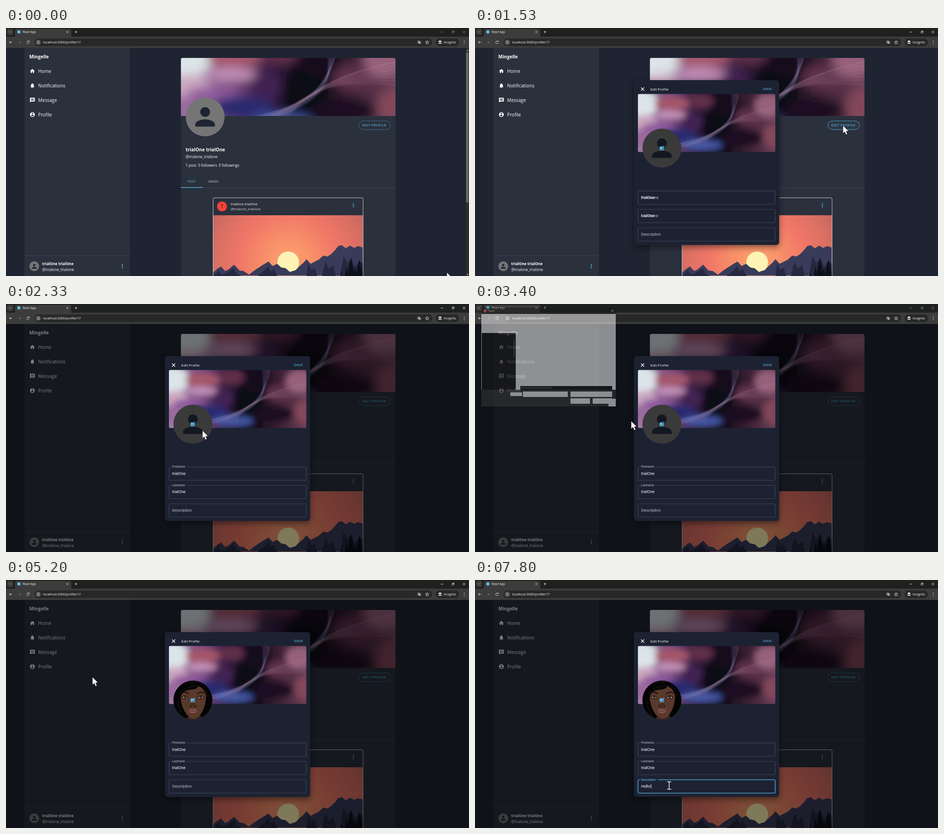
Write an HTML page that moves like this. It is 1023x547 px and loops after 8000 ms.

```html
<!DOCTYPE html>
<html lang="en">
<head>
<meta charset="utf-8">
<title>Edit profile</title>
<style>
html, body { margin: 0; width: 100%; height: 100%; overflow: hidden; background: #1e2431; }
svg.stage { display: block; width: 100vw; height: 100vh; }
text { font-family: 'Open Sans', 'Noto Sans', sans-serif; fill: #fff; white-space: pre; }
.a { font-family: 'Liberation Sans', Arial, sans-serif; }
.b { font-weight: 700; }
.m { font-weight: 500; }
.cyan { fill: #5bbdec; }
.ln { fill: none; stroke: #e6e6e6; stroke-width: .9; }
.c { text-anchor: middle; }
.btn { font-size: 7.47px; letter-spacing: .21px; }
.dlg text { font-size: 5.95px; }
</style>
</head>
<body>
<svg class="stage" viewBox="0 0 1023 547" preserveAspectRatio="none">
<defs>
  <filter id="soft" filterUnits="userSpaceOnUse" x="-320" y="-170" width="640" height="340"><feGaussianBlur stdDeviation="11"/></filter>
  <filter id="haze" filterUnits="userSpaceOnUse" x="-320" y="-170" width="640" height="340"><feGaussianBlur stdDeviation="1.3"/></filter>
  <filter id="shade" x="-15%" y="-15%" width="130%" height="130%"><feDropShadow dx="0" dy="5" stdDeviation="7" flood-opacity=".45"/></filter>
  <linearGradient id="base">
    <stop offset="0" stop-color="#b79ab4"/><stop offset=".3" stop-color="#74457a"/>
    <stop offset=".45" stop-color="#2c1738"/><stop offset=".6" stop-color="#100a18"/>
    <stop offset=".75" stop-color="#3c2034"/><stop offset="1" stop-color="#84506a"/>
  </linearGradient>
  <radialGradient id="sky" gradientUnits="userSpaceOnUse" cx="624" cy="517" r="215">
    <stop offset="0" stop-color="#fca670"/><stop offset=".25" stop-color="#f88f69"/>
    <stop offset=".5" stop-color="#f07767"/><stop offset=".75" stop-color="#d96f63"/><stop offset="1" stop-color="#b8625b"/>
  </radialGradient>
  <clipPath id="coverBox"><path d="M386.500 194V70q0-4 4-4H856.500q4 0 4 4V194z"/></clipPath>
  <clipPath id="modalCover"><rect x="360" y="145.500" width="303.500" height="128" rx="3"/></clipPath>
  <clipPath id="photoBox"><rect x="458" y="413" width="331" height="134"/></clipPath>
  <clipPath id="face"><circle cx="413" cy="265" r="43"/></clipPath>
  <g id="art">
    <g id="blobs" filter="url(#soft)"></g>
    <g id="rays" filter="url(#haze)" fill="none"></g>
  </g>
  <path id="person" d="M0 0c2.210 0 4-1.790 4-4s-1.790-4-4-4-4 1.790-4 4 1.790 4 4 4zm0 2c-2.670 0-8 1.340-8 4v2h16v-2c0-2.660-5.330-4-8-4z"/>
  <g id="more"><circle cy="-3.500" r="1.150"/><circle r="1.150"/><circle cy="3.500" r="1.150"/></g>
  <path id="down" d="M-2.200-1.100 0 1.100 2.200-1.100" fill="none" stroke="#ddd" stroke-width=".8"/>
  <path id="cross" d="M-2.800-2.800 2.800 2.800M2.800-2.800-2.800 2.800" fill="none"/>
</defs>

<!-- page -->
<rect width="1023" height="547" fill="#1e2431"/>
<rect x="41" y="44" width="233" height="503" fill="#2b303d"/>
<text class="b" x="51.500" y="66.500" font-size="10.100">Mingelle</text>
<g id="nav"></g>
<path d="M41 502H274" stroke="#454b59" stroke-width=".8"/>
<circle cx="62.500" cy="525.500" r="10.700" fill="#757575"/>
<use href="#person" transform="translate(62.500 525.500)scale(.67)" fill="#1e2431"/>
<text class="b" x="80" y="522.500" font-size="8.100">trialOne trialOne</text>
<text x="80" y="535.500" font-size="8.200">@trialone_trialone</text>
<use href="#more" x="257" y="525.500" class="cyan"/>

<rect x="386.500" y="66" width="474" height="481" rx="4" fill="#2b303d"/>
<g clip-path="url(#coverBox)"><use href="#art" transform="translate(623.500 130)"/></g>
<circle cx="440" cy="196" r="43" fill="#757575"/>
<use href="#person" transform="translate(440 196)scale(2.700)" fill="#1e2431"/>
<rect x="779.500" y="205" width="70" height="19" rx="9.500" fill="none" stroke="#5bbdec" stroke-opacity=".55" stroke-width=".8"/>
<rect id="hover" x="779.500" y="205" width="70" height="19" rx="9.500" fill="#5bbdec" fill-opacity=".04" stroke="#5bbdec" stroke-opacity=".6" stroke-width=".8"/>
<text class="a cyan btn" x="787.300" y="217">EDIT PROFILE</text>
<text class="b" x="397" y="272" font-size="10.200">trialOne trialOne</text>
<g font-size="8.200">
  <text x="397" y="287">@trialone_trialone</text>
  <text x="397" y="306">1 post</text><text x="424.500" y="306">0 followers</text><text x="470" y="306">0 followings</text>
</g>
<g font-size="6.500" letter-spacing=".2">
  <text class="a cyan" x="401" y="341.300">POST</text><text class="a" x="447" y="341.300" style="fill:#c3c6cb">SAVED</text>
</g>
<path d="M386.500 352.300H860.500" stroke="#4a505d" stroke-width=".8"/>
<path d="M386.500 351.600H434.500" stroke="#5bbdec" stroke-width="1.200"/>
<g id="photo" clip-path="url(#photoBox)"></g>
<path d="M457.500 548V377.500q0-3 3-3H786q3 0 3 3V548" fill="none" stroke="#dcdee2" stroke-width=".9"/>
<circle cx="477.300" cy="393.500" r="10.800" fill="#f44336"/>
<text class="a c" x="477.300" y="397.300" font-size="10.600" style="fill:#1e2431">T</text>
<text class="m" x="496.500" y="391" font-size="7.600">trialOne trialOne</text>
<text x="496.500" y="401.800" font-size="7.700" style="fill:#d5d7db">@trialone_trialone</text>
<use href="#more" x="767.500" y="391" class="cyan"/>
<g id="scroll">
  <rect x="1015.500" y="44" width="7.500" height="503" fill="#2c2c2c"/>
  <rect x="1016.700" y="53" width="5.200" height="332" rx="2.600" fill="#686868"/>
  <path d="M1017.200 50.500l2.300-3 2.300 3zM1017.200 542.500l2.300 3 2.300-3z" fill="#aaa"/>
</g>

<rect id="backdrop" y="44" width="1023" height="503" fill="#000" fill-opacity=".5"/>

<!-- modal -->
<g id="modal">
  <rect x="351" y="115" width="321" height="363.500" rx="6" fill="#1e2431" filter="url(#shade)"/>
  <use href="#cross" transform="translate(370.300 134.700)scale(1.250)" stroke="#fff" stroke-width="1.050"/>
  <text class="m" x="387.500" y="137.600" font-size="8">Edit Profile</text>
  <text class="a cyan btn" x="636" y="136.700">SAVE</text>
  <g clip-path="url(#modalCover)"><use href="#art" transform="translate(511.500 209.500)scale(.64)"/></g>
  <circle cx="413" cy="265" r="43" fill="#3a3a3a"/>
  <use href="#person" transform="translate(413 265)scale(2.700)" fill="#131722"/>
  <g id="portrait" clip-path="url(#face)">
    <rect x="370" y="222" width="86" height="86" fill="#040404"/>
    <path d="M400 290h29l6 22h-40z" fill="#38241b"/>
    <path d="M385 247C384 226 441 224 442 248C444 268 438 288 426 301Q414 311 403 301C391 289 385 269 385 247Z" fill="#59392b"/>
    <path d="M385 247C384 270 391 289 403 301L396 308H380V240Z" fill="#040404"/>
    <path d="M442 250C443 270 437 288 428 300L440 304L456 262Z" fill="#040404"/>
    <path d="M380 262C378 228 410 218 428 226C446 232 448 246 444 262C440 246 436 237 424 234C424 246 397 237 390 250Q384 257 386 268Z" fill="#040404"/>
    <path d="M385 252C391 234 410 238 424 231M394 230Q408 223 422 226M433 232Q445 242 446 258M380 266q1 20 11 34" fill="none" stroke="#2a2a2a" stroke-width=".8"/>
    <path d="M387 250q8-6 17 1M422 251q9-6 16-2" fill="none" stroke="#100b09" stroke-width="2"/>
    <path d="M388 259q7-7 15 1q-8 5-15-1zM422 260q8-8 16-1q-7 6-16 1z" fill="#978a83" stroke="#0b0706" stroke-width="1.200"/>
    <circle cx="396" cy="258.500" r="2.700" fill="#40251a"/><circle cx="430" cy="258.500" r="2.700" fill="#40251a"/>
    <path d="M411 264q-2 9-6 13q2 5 8 4q7 1 8-4q-4-4-5-10" fill="#4b2e22"/>
    <path d="M405 279q3-2 5 1M416 280q3-3 5-1" fill="none" stroke="#180e0a" stroke-width="1.200"/>
    <path d="M401 288q8-5 12-2q4-3 12 2q-12 11-24 0z" fill="#8a5758"/>
    <path d="M401 288q12 3 24 0" fill="none" stroke="#24100f" stroke-width=".9"/>
  </g>
  <path class="cyan" transform="translate(406.600 258.600)scale(.533)" d="M19 7v2.990s-1.990.010-2 0V7h-3s.010-1.990 0-2h3V2h2v3h3v2h-3zm-3 4V8h-3V5H5c-1.100 0-2 .900-2 2v12c0 1.100.900 2 2 2h12c1.100 0 2-.900 2-2v-8h-3zM5 19l3-4 2 3 3-4 4 5H5z"/>
  <g id="fields"></g>
  <text class="a" id="typed" x="367" y="457.700" font-size="8.530"></text>
  <path id="caret" d="M367.400 450V460" stroke="#fff" stroke-width=".8"/>
</g>

<!-- browser -->
<rect width="1023" height="20" fill="#1f2020"/>
<rect y="19" width="1023" height="25" fill="#3c3c3c"/>
<path d="M16 19.500q4 0 4-4V6q0-4 4-4H140q4 0 4 4v9.500q0 4 4 4z" fill="#3c3c3c"/>
<rect x="2" y="2" width="14" height="13.500" rx="4" fill="#3c3c3c"/>
<use href="#down" x="9" y="8.700"/>
<circle cx="28.500" cy="8.600" r="3.600" fill="#58c4dc"/>
<text x="37" y="11" font-size="6.200">React App</text>
<use href="#cross" transform="translate(135.500 8.700)scale(.75)" stroke="#e6e6e6" stroke-width="1.200"/>
<path class="ln" d="M151.500 8.700h6M154.500 5.700v6"/>
<path class="ln" d="M13.500 31.500h-6m2.800-2.800-2.800 2.800 2.800 2.800"/>
<path class="ln" style="stroke:#777" d="M26.500 31.500h6m-2.800-2.800 2.800 2.800-2.800 2.800"/>
<path class="ln" d="M51.300 30a3 3 0 1 0 .200 2.600M51.700 28v2.400h-2.400"/>
<rect x="63" y="23" width="879" height="17" rx="8.500" fill="#282828"/>
<circle cx="71.500" cy="31.500" r="6.500" fill="#3c3c3c"/>
<circle class="ln" cx="71.500" cy="31.500" r="3.300"/><path class="ln" d="M71.500 31v2.300M71.500 29.300v.900"/>
<text x="82" y="34" font-size="7.150">localhost:3000/profile/17</text>
<path class="ln" d="M908.800 31.500q4.200-5.600 8.400 0q-4.200 5.600-8.400 0zM909.800 27.800l7 7.400"/><circle cx="913" cy="31.500" r="1.500" fill="#e6e6e6"/>
<path class="ln" d="M930.500 27.600l1.100 2.700 2.900.200-2.200 1.900.700 2.900-2.500-1.600-2.500 1.600.700-2.900-2.200-1.900 2.900-.200z"/>
<rect x="949" y="23" width="52" height="17" rx="8.500" fill="#282828"/>
<path d="M955 31h8v-.900h-1.400l-.700-2.600h-3.800l-.700 2.600H955z" fill="#e6e6e6"/><path class="ln" d="M958.500 33.300h1"/><circle cx="957.200" cy="33.400" r="1.500" fill="#e6e6e6"/><circle cx="960.800" cy="33.400" r="1.500" fill="#e6e6e6"/>
<text x="967" y="33.700" font-size="6.250">Incognito</text>
<g fill="#e6e6e6"><circle cx="1012.500" cy="28.500" r=".8"/><circle cx="1012.500" cy="31.500" r=".8"/><circle cx="1012.500" cy="34.500" r=".8"/></g>
<g id="controls" fill="none" stroke-width=".9">
  <path d="M960.500 9h5.500"/><rect x="985.500" y="7.500" width="3.600" height="3.600" rx=".8"/><path d="M986.700 6.500h2.500q1 0 1 1v2.400"/>
  <use href="#cross" x="1012" y="8.800"/>
</g>

<!-- half-painted file dialog -->
<g id="ghost">
  <rect x="14" y="8" width="297" height="218" rx="4" fill="#191919"/>
  <rect x="14" y="189" width="297" height="37" fill="#383838"/>
  <g id="blanks" fill="#fff"></g>
  <path d="M86.500 78V118M100 185H169" stroke="#999"/>
  <circle cx="22" cy="15" r="3.600" fill="#e2503f"/><text x="29" y="17" font-size="5.600">Open</text>
  <use href="#cross" x="303.500" y="15" stroke="#fff" stroke-width=".9"/>
</g>

<!-- file dialog -->
<g id="dialog" class="dlg">
  <rect x="2" y="-5" width="327" height="244" rx="4" fill="#1c1c1c" stroke="#3d3d3d" stroke-width=".6"/>
  <rect x="2.500" y="60" width="326" height="138" fill="#191919"/>
  <path d="M2.300 197.500H328.700V235q0 4-4 4H6.300q-4 0-4-4z" fill="#333"/>
  <circle cx="11.300" cy="6" r="4.300" fill="#e2503f"/>
  <text x="18.500" y="8.300">Open</text>
  <use href="#cross" x="320.500" y="6" stroke="#fff" stroke-width=".9"/>
  <path class="ln" d="M17 29h-6m2.500-2.500L11 29l2.500 2.500M29.500 29h6M33 26.500l2.500 2.500-2.500 2.500M64.500 32v-6M62 28.500l2.500-2.500 2.500 2.500"/>
  <use href="#down" x="48.500" y="29"/>
  <g fill="none" stroke="#505050" stroke-width=".8"><rect x="76" y="20" width="132" height="18"/><rect x="214.500" y="20" width="107.500" height="18"/></g>
  <path class="ln" d="M85 25.500v5M83 28.700l2 2 2-2M82 32.500h6M93.500 27l2 2-2 2M199.500 27.500a2.700 2.700 0 1 0 .300 2.300M200 25.800v2h-2"/>
  <text x="100.500" y="31">Downloads</text><use href="#down" x="178" y="29.300"/>
  <text x="219" y="31" style="fill:#999">Search Downloads</text>
  <circle class="ln" cx="312" cy="28.300" r="1.800"/><path class="ln" d="M310.700 29.700l-2.200 2.300"/>
  <text x="12.500" y="53.700">Organize</text><path d="M40.500 51h4l-2 2.200zM277.300 51h4l-2 2.200z" fill="#ddd"/>
  <text x="61" y="53.700">New folder</text>
  <rect x="264" y="48" width="7.500" height="7.500" fill="#555" stroke="#ddd" stroke-width=".8"/><path class="ln" d="M264 50.500h7.500M264 53h7.500"/>
  <rect class="ln" x="293" y="48" width="8" height="7.500"/><rect x="297" y="48.500" width="3.700" height="6.500" fill="#4aa8e8"/>
  <circle cx="316.500" cy="51.700" r="4.500" fill="#1687d9"/><text class="c" x="316.500" y="53.900">?</text>
  <rect x="4" y="60.500" width="73" height="16.500" rx="1.500" fill="#373737"/>
  <g id="places"></g>
  <path d="M8 86.500H72M88 60V197" stroke="#3a3a3a" stroke-width=".7"/>
  <path d="M82 76V120" stroke="#999" stroke-width="1"/>
  <path d="M97 193.500H320" stroke="#2c2c2c" stroke-width="1"/><path d="M97 193.500H173" stroke="#aaa" stroke-width="1.200"/>
  <text x="104" y="69.300">Name</text>
  <use href="#down" x="94.500" y="84"/><text x="99.500" y="87" style="font-size:7.800px">Today</text>
  <rect id="row" x="95.500" y="92" width="233" height="12.500"/>
  <g id="files"></g>
  <text x="72" y="211">File name:</text>
  <g stroke="#8a8a8a" stroke-width=".8" fill="#1d1d1d">
    <rect x="104" y="203" width="108.500" height="12"/><rect x="219.500" y="203" width="100" height="12" fill="#333"/>
    <rect x="220" y="219" width="45.500" height="12" rx="1.500" fill="#333" stroke="#eee"/><rect x="273" y="219" width="46" height="12" rx="1.500" fill="#333"/>
  </g>
  <text id="picked" x="106.500" y="211">profile</text>
  <use href="#down" x="208" y="209.300"/><use href="#down" x="315" y="209.300"/>
  <text x="221.500" y="211">Image Files</text>
  <text class="c" x="242.700" y="227">Open</text><text class="c" x="296" y="227">Cancel</text>
  <path d="M319.500 220h9.500v9.500h-9.500zM310.500 231.500h9.500v7h-9.500z" fill="#fff"/>
  <path d="M327 233l-4 4M327 235.500l-1.500 1.500" stroke="#999" stroke-width=".8"/>
</g>

<path id="arrow" d="M0 0v17.500l4.100-3.700 2.700 6.600 3.100-1.300-2.700-6.400h5.400z" fill="#fff" stroke="#111" stroke-width=".7"/>
<path id="beam" d="M424.500 445h3.500l1 .800 1-.800h3.500M429 445.500v15.500M424.500 461.500h3.500l1-.800 1 .800h3.500" fill="none" stroke="#fff" stroke-width="1.500" style="filter:drop-shadow(0 0 .5px #000)"/>
</svg>

<script>
const $ = id => document.getElementById(id);
const fill = (id, list, make) => { $(id).innerHTML += list.map(make).join(''); };

// Cover art: blurred colour blobs under two soft fans of light
fill('blobs', [0], () => '<rect x="-290" y="-150" width="580" height="300" fill="url(#base)"/>');
fill('blobs', [
  [-228, -66, 62, 46, '#dbe4e8'], [-212, 0, 42, 28, '#cba6bf'], [-120, -66, 60, 24, '#a4566a'],
  [-128, -28, 50, 15, '#c08fb8'], [-90, -26, 24, 11, '#c48fb4'], [-165, 22, 62, 24, '#8f5a9c'],
  [-222, 55, 40, 32, '#9a6a9e'], [-100, 46, 68, 28, '#2b2c70'], [-50, -2, 38, 30, '#432152'],
  [-20, -75, 44, 26, '#5e2f4a'], [36, 12, 52, 58, '#0d0918'], [70, -60, 42, 40, '#170c1c'],
  [150, -20, 52, 30, '#5d324c'], [212, -60, 46, 38, '#96607a'], [125, 52, 70, 26, '#1f1122'],
  [228, 45, 32, 40, '#83475a'], [-15, 76, 70, 18, '#4254a0']
], ([x, y, rx, ry, c]) => `<ellipse cx="${x}" cy="${y}" rx="${rx}" ry="${ry}" fill="${c}"/>`);
const ray = (d, color, i) =>
  `<path d="${d}" stroke="${color}" stroke-width="${i ? 5 : 1.6}" stroke-opacity="${i ? .09 : .42}"/>`;
fill('rays', [...Array(7).keys()], i =>
  ray(`M${-150 + i * 12} 82C${-20 + i * 3} 60 35 ${34 + i * 2} ${62 + i} ${6 + i}S${104 - i * 3} -55 ${112 - i * 4} -105`, '#a9a4e0', i) +
  ray(`M${-90 + i * 14} 84C0 52 35 26 75 ${1 + i}S190 ${-46 + i * 6} 250 ${-58 + i * 9}`, '#d09ab8', i));

// Sunset
const pine = ([x, y, w]) => {
  let right = '', left = '';
  for (let k = 1; k < 8; k++) {
    const half = w * k / 7, low = y + k * 6;
    right += `L${x + half} ${low}L${x + half * .5} ${low - 1}`;
    left = `L${x - half * .5} ${low - 1}L${x - half} ${low}` + left;
  }
  return `<path d="M${x} ${y}${right}V560H${x - w / 2}${left}Z" fill="#0d0f1a"/>`;
};
fill('photo', [0], () => `<rect x="458" y="413" width="331" height="134" fill="url(#sky)"/>
  <circle cx="623.500" cy="517" r="24" fill="#fdf3b4"/>
  <path fill="#383c5a" d="M458 539l9-8 8-5 9 10 7-3 13-11 12 13 9 1 12 8 10-8 12-8 11-7 10-6 9 10 10-5 9 8 10 2 9 8 13-4 8-8 9-8 7-8 9 10 10-5 8-4 10-9 9 2 8-5 9-9 7-9 8-2 9 7 9-6 9 5 9-4 10 3v62H458z"/>
  <path fill="#25283f" d="M458 547l12-13 6 10 13-4 14-11 7 14 14 6zM556 547l15-12 9-10 4 12 8-5 8 15zM664 547l4-28 6 14 8-4 6 18zM698 547l8-32 7 16 10-8 6 24zM738 547l8-44 8 16 9-12 8 20 10-14 10 8v26z"/>`);
fill('photo', [[762, 508, 12], [781, 511, 13], [752, 526, 8], [771, 528, 9], [741, 535, 6], [733, 540, 5]], pine);

// Sidebar
fill('nav', [
  ['Home', 'M10 20v-6h4v6h5v-8h3L12 3 2 12h3v8z'],
  ['Notifications', 'M12 22c1.1 0 2-.9 2-2h-4c0 1.1.89 2 2 2zm6-6v-5c0-3.07-1.64-5.64-4.5-6.32V4c0-.83-.67-1.5-1.5-1.5s-1.5.67-1.5 1.5v.68C7.63 5.36 6 7.92 6 11v5l-2 2v1h16v-1l-2-2z'],
  ['Message', 'M20 2H4c-1.1 0-2 .9-2 2v18l4-4h14c1.1 0 2-.9 2-2V4c0-1.1-.9-2-2-2zm-2 12H6v-2h12v2zm0-3H6V9h12v2zm0-3H6V6h12v2z'],
  ['Profile', 'M12 2a10 10 0 1 0 0 20a10 10 0 1 0 0-20zm0 3a3 3 0 1 1 0 6a3 3 0 1 1 0-6zm0 14.2c-2.5 0-4.71-1.28-6-3.22.03-1.99 4-3.08 6-3.08s5.97 1.09 6 3.08c-1.29 1.94-3.5 3.22-6 3.22z']
], ([name, d], i) => `<path d="${d}" fill="#fff" fill-rule="evenodd" transform="translate(51.900 ${88.6 + i * 32})scale(.533)"/>
  <text x="71" y="${98.8 + i * 32}" font-size="10.200">${name}</text>`);

// Form
fill('fields', [['Firstname', 35, 'trialOne'], ['Lastname', 34, 'trialOne'], ['Description', 41, '']], ([label, gap, value], i) =>
  `<g transform="translate(360 ${359 + i * 40.6})">
    <rect id="box${i}" x=".2" y=".4" width="303" height="29.400" rx="2.200" fill="none" stroke="#505663" stroke-width=".8"/>
    <path id="gap${i}" d="M0 .4H${gap}" stroke="#1e2431" stroke-width="2.200"/>
    <text class="a" x="7" y="17.500" font-size="8.530">${value}</text>
    <text class="a" id="label${i}" font-size="8.530" letter-spacing=".08" style="fill:#c0c4cb">${label}</text>
  </g>`);
fill('typed', [...'Hello!'], (ch, i) => `<tspan id="key${i}">${ch}</tspan>`);

// File dialog
fill('places', [['Gallery', 69, '#3f9be0'], ['Desktop', 103, '#2aa5d8'], ['Downloads', 120, ''], ['Documents', 137, '#8fa6bd'],
  ['Pictures', 154, '#3f9be0'], ['Music', 171, '#e0705a'], ['Videos', 188, '#8d63b8']], ([name, y, c], i) =>
  (c ? name == 'Music' ? `<circle cx="25" cy="${y}" r="4" fill="${c}"/>` : `<rect x="21" y="${y - 3.5}" width="8" height="7" rx="1" fill="${c}"/>`
     : `<path class="ln" d="M25 ${y - 4}v6m-2.200-2.200 2.200 2.200 2.200-2.200M22 ${y + 4}h6"/>`) +
  (/Gallery|Pictures/.test(name) ? `<path d="M22 ${y + 2.8}l3-4 3.500 4z" fill="#e8f3fb"/>` : '') +
  `<text x="32" y="${y + 2.2}">${name}</text>` +
  (i ? `<path d="M70 ${y + 2.5}l1.700-1.700M71.200 ${y - 1.2}l2.500 2.500M72 ${y - .3}l1.300-1.700 1.500 1.500-1.700 1.300" fill="none" stroke="#aaa" stroke-width="1"/>` : ''));
fill('files', [['profile', 98.5], ['sunrise', 113.5]], ([name, y]) =>
  `<path d="M99 ${y - 4}h4l2 2v6h-6z" fill="#eef4f8"/><rect x="100" y="${y - 1}" width="4" height="3.500" fill="#3f9be0"/><text x="108.500" y="${y + 2.2}">${name}</text>`);
fill('blanks', [[14, 22, 297, 42], [90, 64, 221, 117], [90, 181, 10, 8], [303, 181, 8, 8], [14, 64, 1, 125], [78, 195, 26, 8],
  [106, 193, 99, 12], [211, 193, 92, 12], [211, 208, 43, 12], [260, 208, 43, 12], [303, 209, 8, 17], [295, 220, 8, 6]],
  ([x, y, w, h]) => `<rect x="${x}" y="${y}" width="${w}" height="${h}"/>`);

// Motion: [ms, css, jumps until the next key]; holds when jumps is left out
const sheet = document.head.appendChild(document.createElement('style'));
let rules = '';
const track = (id, keys) => {
  rules += `@keyframes ${id}{` + keys.map(([ms, css, n]) =>
    `${Math.max(0, ms - 4) / 80}%{${css};animation-timing-function:${n ? `steps(${n})` : 'step-end'}}`).join('') +
    `}#${id}{animation:${id} 8s infinite}`;
};
const show = (id, ...times) => track(id, [[0, 'opacity:0'], ...times.map((ms, i) => [ms, `opacity:${1 - i % 2}`])]);
const at = (x, y, s = 1) => `transform:translate(${x}px,${y}px) scale(${s})`;

track('arrow', [
  [0, at(974, 539), 6], [400, at(874, 335), 7], [867, at(818, 219), 4], [1133, at(813, 215)],
  [1533, at(813, 215), 4], [1800, at(680, 240), 4], [2067, at(500, 275), 4], [2333, at(434, 279), 4],
  [2600, at(411, 264)], [2733, at(411, 264), 10], [3400, at(345, 258), 3], [3600, at(300, 220), 9],
  [4200, at(126, 98)], [4800, at(126, 98), 6], [5200, at(191, 214), 6], [5600, at(427.5, 453.5)],
  [5867, at(-50, -50)]
]);
show('beam', 5867);
show('hover', 867, 1600);
track('scroll', [[0, 'opacity:1'], [1467, 'opacity:0']]);
track('controls', [[0, 'stroke:#858585'], [1333, 'stroke:#f2f2f2'], [3333, 'stroke:#858585'], [4733, 'stroke:#f2f2f2']]);
track('modal', [[0, 'opacity:0'], [1467, 'opacity:.5'], [1533, 'opacity:1']]);
track('backdrop', [[0, 'opacity:0'], [1533, 'opacity:0', 4], [1800, 'opacity:1']]);
track('ghost', [[0, 'opacity:0'], [3333, 'opacity:.2'], [3400, 'opacity:.52'], [3467, 'opacity:0']]);
track('dialog', [
  [0, 'opacity:0;' + at(5, 3.5, .97)], [3467, 'opacity:.85;' + at(5, 3.5, .97)], [3533, 'opacity:1;' + at(0, 0)],
  [4867, 'opacity:.6;' + at(5, 3.5, .97)], [4933, 'opacity:.2;' + at(10, 7, .94)], [5000, 'opacity:0;' + at(10, 7, .94)]
]);
track('row', [[0, 'fill:#191919'], [4133, 'fill:#4d4d4d'], [4467, 'fill:#666']]);
show('picked', 4467);
show('portrait', 5067);

[1533, 1533, 6133].forEach((ms, i) => {
  const tint = i == 2 ? ';fill:#5bbdec' : '';
  track('label' + i, [[0, at(7, 17.5)], [ms, at(7, 17.5) + tint, 3], [ms + 200, at(7, 2.3, .75) + tint]]);
  track('gap' + i, [[0, at(4, 0, 0)], [ms, at(4, 0, 0), 3], [ms + 200, at(4, 0)]]);
});
track('box2', [[0, 'stroke:#505663'], [5600, 'stroke:#e8e8e8'], [6133, 'stroke:#5bbdec;stroke-width:1.3px']]);

const keyTimes = [7133, 7200, 7267, 7467, 7600, 7800], stops = [6.2, 10.9, 12.8, 14.7, 19.4, 21.8];
keyTimes.forEach((ms, i) => track('key' + i, [[0, 'fill:#fff0'], [ms, 'fill:#fff']]));
track('caret', [[0, 'opacity:0'], [6133, 'opacity:1'], [6667, 'opacity:0'],
  ...keyTimes.map((ms, i) => [ms, 'opacity:1;' + at(stops[i], 0)])]);
sheet.textContent = rules;
</script>
</body>
</html>
```
